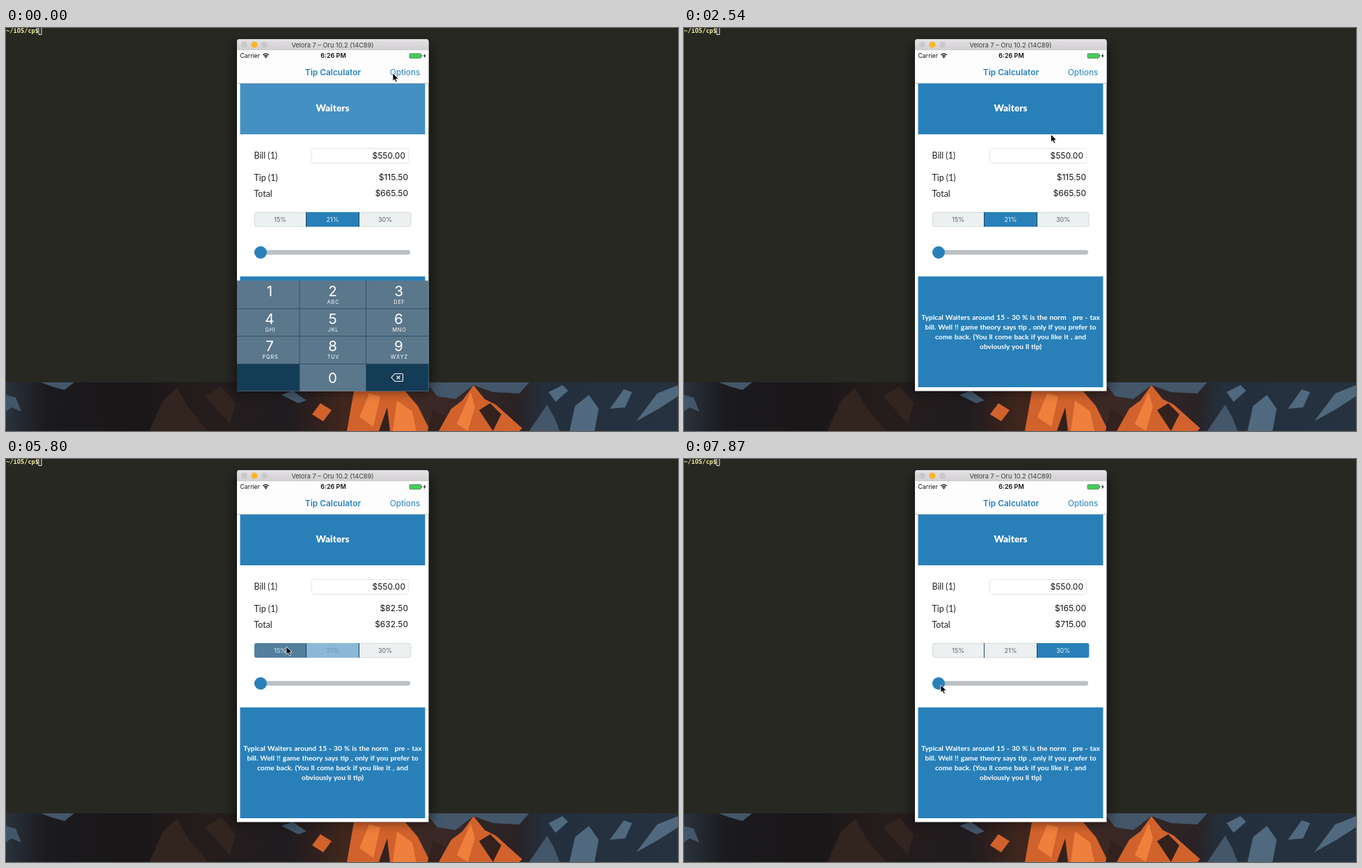
Recreate the animation shown at these times as an HTML page. Size 966x580 px, loop 8 s.

```html
<!DOCTYPE html>
<html lang="en">
<head>
<meta charset="utf-8">
<title>Tip Calculator</title>
<style>
  html, body { margin: 0; width: 100%; height: 100%; overflow: hidden; background: #272822; }
  svg { display: block; width: 966px; height: 580px; }
  text { font-family: Inter, sans-serif; white-space: pre; }
  .lato { font-family: Lato, sans-serif; }
  .mid { text-anchor: middle; }
  .end { text-anchor: end; font-size: 12px; fill: #111; }
  .label { font-size: 12.4px; fill: #222; }
  .note { font-size: 10.2px; font-weight: 700; fill: #fff; word-spacing: .6px; }
  .pct { font-size: 9px; }
  .digit { font-size: 20.6px; fill: #fff; }
  .abc { font-size: 7.3px; letter-spacing: .8px; fill: #fff; }
</style>
</head>
<body>
<svg viewBox="0 0 966 580">
  <defs>
    <linearGradient id="bar" x2="0" y2="1">
      <stop stop-color="#e4e2e4"/><stop offset="1" stop-color="#d0ced0"/>
    </linearGradient>
    <linearGradient id="rock">
      <stop stop-color="#2a323c"/><stop offset=".06" stop-color="#1b1a1e"/>
      <stop offset=".2" stop-color="#1a1618"/><stop offset=".3" stop-color="#251d1c"/>
      <stop offset=".42" stop-color="#1f1b1f"/><stop offset=".5" stop-color="#40261d"/>
      <stop offset=".64" stop-color="#3a2926"/><stop offset=".76" stop-color="#2a2225"/>
      <stop offset=".8" stop-color="#232f3c"/><stop offset="1" stop-color="#26323f"/>
    </linearGradient>
    <filter id="blur" x="-20%" y="-20%" width="140%" height="140%"><feGaussianBlur stdDeviation="8"/></filter>
    <clipPath id="win"><path d="M332 522.500V20q0-4 4-4H603.500q4 0 4 4V522.500Z"/></clipPath>
    <clipPath id="seg"><rect x="357" y="265" width="225.500" height="21" rx="3"/></clipPath>
  </defs>

  <!-- desktop -->
  <rect width="966" height="580" fill="#272822"/>
  <rect y="510" width="966" height="70" fill="url(#rock)"/>
  <g fill="#43566a">
    <path d="M50 510H98L84 521 66 516Z"/>
    <path d="M0 528L14 532 22 552 8 546 0 552Z"/>
    <path d="M396 528L412 522 432 536 420 540Z"/>
    <path d="M604 510H752L738 526 700 524 672 514 646 534 620 530Z"/>
    <path d="M752 580L778 542 788 560 796 580Z"/>
  </g>
  <g fill="#50697f">
    <path d="M810 580L818 544 838 528 852 548 846 580Z"/>
    <path d="M868 548L888 520 900 524 890 546Z"/>
    <path d="M906 566L936 526 966 514V530L938 548Z"/>
    <path d="M780 524L800 514 808 522 790 538Z"/>
  </g>
  <path fill="#32241f" d="M206 580L226 536 246 518 262 546 290 580ZM286 530L310 516 330 540 322 570Z"/>
  <g fill="#d2622c">
    <path d="M490 580L500 523H574L592 544 610 580Z"/>
    <path d="M622 580L640 548 656 536 672 514 688 534 704 542 742 576 738 580Z"/>
    <path d="M440 556L452 540 468 550 456 566Z"/>
  </g>
  <g fill="#ee7f3c">
    <path d="M508 560L522 526 538 530 528 574Z"/>
    <path d="M556 580L562 536 584 552 590 580Z"/>
    <path d="M648 570L668 524 674 546 664 580Z"/>
  </g>
  <path fill="#33211e" d="M536 580L548 546 552 580ZM606 580L614 548 632 560 622 580ZM680 550L696 540 712 556 700 580Z"/>

  <text x="0" y="7.300" font-size="8.700" font-weight="700" fill="#f3f0a0" style="font-family:'DejaVu Sans Mono',monospace">~/iOS/cp$</text>
  <path d="M47 -1V9.500H51V-1" fill="none" stroke="#eee"/>

  <!-- simulator window -->
  <rect x="328" y="24" width="284" height="500" fill="#000" opacity=".45" filter="url(#blur)"/>
  <g clip-path="url(#win)">
    <rect x="332" y="16" width="276" height="507" fill="#fff"/>
    <rect x="332" y="16" width="276" height="16.500" fill="url(#bar)"/>
    <g fill="#cac8ca"><circle cx="342.500" cy="24" r="4.500"/><circle cx="371.500" cy="24" r="4.500"/></g>
    <circle cx="357" cy="24" r="4.600" fill="#fdb42c"/>
    <text class="mid" x="469.500" y="27.600" font-size="9.200" fill="#3c3c3c">Velora 7 – Oru 10.2 (14C89)</text>

    <rect x="332" y="32" width="276" height="47" fill="#fdfdfd"/>
    <path d="M332 79.500H608" stroke="#c2c4c6"/>
    <text x="336.500" y="43.200" font-size="8.700" fill="#111">Carrier</text>
    <g fill="none" stroke="#111" stroke-width="1.300">
      <path d="M369.300 38.800Q373.500 35 377.700 38.800M371 40.600Q373.500 38.400 376 40.600"/>
    </g>
    <path d="M371.900 41.700Q373.500 40.500 375.100 41.700L373.500 43.500Z" fill="#111"/>
    <text class="mid" x="470.500" y="43.300" font-size="9" font-weight="600" fill="#111">6:26 PM</text>
    <rect x="580" y="36.800" width="16.500" height="6.600" rx="1" fill="#42cf57" stroke="#5a6a5c" stroke-width=".7"/>
    <rect x="597.200" y="38.800" width="1" height="2.600" fill="#444"/>
    <path d="M602.600 36.500L599.800 40.600H601.500L600.800 43.600 603.900 39.400H602Z" fill="#222"/>
    <g fill="#2980b9">
      <text class="mid" x="470" y="67.500" font-size="11.900" font-weight="600">Tip Calculator</text>
      <text class="mid" x="573.500" y="67.500" font-size="11.900">Options</text>
    </g>

    <rect id="head" x="336.500" y="80" width="266" height="73" fill="#2980b9"/>
    <text class="lato mid" x="469.500" y="120.300" font-size="13.600" font-weight="900" fill="#fff">Waiters</text>

    <text class="lato label" x="356.500" y="188">Bill (1)</text>
    <text class="lato label" x="356.500" y="219.800">Tip (1)</text>
    <text class="lato label" x="356.500" y="243">Total</text>
    <rect x="439.500" y="173.500" width="139" height="21" rx="3" fill="#fff" stroke="#e4e4e4"/>
    <text class="end" x="574" y="187.800">$550.00</text>
    <rect id="caret" x="572.300" y="177" width="2" height="14" fill="#fff"/>
    <text class="end" id="tip" x="578" y="219"></text>
    <text class="end" id="total" x="578" y="242.300"></text>

    <rect x="357.400" y="265.400" width="224.700" height="20.200" rx="3" fill="#ecf0f1" stroke="#cbd1d4" stroke-width=".8"/>
    <g id="cells" clip-path="url(#seg)"></g>
    <path d="M431.500 265V286M507.500 265V286" stroke="#1d4361"/>

    <rect x="357" y="319.600" width="224" height="6.600" rx="3.300" fill="#bcc0c4"/>
    <circle cx="366" cy="323" r="9" fill="#2980b9"/>

    <rect x="336.500" y="357.500" width="266" height="159.500" fill="#2980b9"/>
    <g class="mid">
      <text class="lato note" x="469.500" y="419.700">Typical Waiters around 15 - 30 % is the norm   pre - tax</text>
      <text class="lato note" x="469.500" y="433.700">bill. Well !! game theory says tip , only if you prefer to</text>
      <text class="lato note" x="469.500" y="447.700">come back. (You ll come back if you like it , and</text>
      <text class="lato note" x="469.500" y="461.700">obviously you ll tip)</text>
    </g>

    <g id="pad">
      <rect x="332" y="363.500" width="276" height="160" fill="#5b778c"/>
      <path d="M332 483.500H422V523H332ZM517.500 483.500H608V523H517.500Z" fill="#153c57"/>
      <path d="M332 404H608M332 443.500H608M332 483.500H608M422 363.500V523M517.500 363.500V523" stroke="#2f5069" fill="none"/>
      <path d="M559 497.500H569Q570.500 497.500 570.500 499V507Q570.500 508.500 569 508.500H559L554 503ZM561.500 500.500L566.500 505.500M566.500 500.500L561.500 505.500" fill="none" stroke="#fff" stroke-width="1.100"/>
    </g>
  </g>

  <path id="cursor" d="M0 0V11.200L2.600 8.900 4.500 13 6.400 12.200 4.600 8.200H8.200Z" fill="#000" stroke="#fff" stroke-width=".8"/>
</svg>
<script>
  const $ = id => document.getElementById(id);
  const LOOP = 8000, TICK = 148.6, LEAD = 9;

  function add(parent, tag, attrs, text = '') {
    const el = document.createElementNS('http://www.w3.org/2000/svg', tag);
    for (const k in attrs) el.setAttribute(k, attrs[k]);
    el.textContent = text;
    return parent.appendChild(el);
  }

  // keypad
  const letters = ['', 'ABC', 'DEF', 'GHI', 'JKL', 'MNO', 'PQRS', 'TUV', 'WXYZ'];
  const keyX = [379, 469.5, 564.5];
  letters.forEach((abc, i) => {
    const x = keyX[i % 3], y = 386 + 39.7 * Math.floor(i / 3);
    add($('pad'), 'text', { class: 'digit mid', x, y }, i + 1);
    add($('pad'), 'text', { class: 'abc mid', x: x + 1, y: y + 11 }, abc);
  });
  add($('pad'), 'text', { class: 'digit mid', x: 469.5, y: 510.5 }, '0');

  // segmented control
  const rates = [15, 21, 30];
  const edges = [357, 431.5, 507.5, 582.5];
  const looks = {
    off: ['none', '#5c6063'],
    on: ['#2980b9', '#e8f1f7'],
    press: ['#537f9d', '#dfe8ee'],
    fade: ['#8bb8d7', '#7592a6']
  };
  const cells = rates.map((rate, i) => ({
    box: add($('cells'), 'rect', { x: edges[i], y: 265, width: edges[i + 1] - edges[i], height: 21 }),
    text: add($('cells'), 'text', { class: 'pct mid', x: (edges[i] + edges[i + 1]) / 2, y: 279 }, rate + '%')
  }));

  // cursor path: tick, x, y
  const path = [
    [0, 556, 65], [3, 556, 66], [7, 551, 79], [9, 500, 110], [10, 488, 117], [13, 488, 117],
    [20, 557, 180], [23, 562, 194], [26, 555, 217], [27, 555, 217], [29, 547, 240], [31, 547, 240],
    [34, 403, 270], [39, 403, 270], [43, 520, 285], [44, 534, 282], [46, 534, 281],
    [52, 368, 324], [53, 369, 325]
  ];
  function cursorAt(n) {
    const i = Math.max(1, path.findIndex(p => p[0] >= n));
    const [a, x, y] = path[i - 1], [b, u, v] = path[i];
    const k = (n - a) / (b - a);
    return [x + (u - x) * k, y + (v - y) * k];
  }

  function render(n) {
    const [x, y] = cursorAt(n);
    $('cursor').setAttribute('transform', `translate(${x} ${y})`);
    $('head').setAttribute('fill-opacity', Math.min(1, .87 + n * .03));
    $('caret').style.display = n > 3 && n < 7 || n > 9 && n < 13 ? '' : 'none';
    $('pad').setAttribute('transform', `translate(0 ${n < 13 ? 0 : n < 14 ? 154.5 : 170})`);

    const pick = n < 38 ? 1 : n < 45 ? 0 : 2;
    const last = n < 45 ? 1 : 0;
    const changing = n === 38 || n === 39 || n === 45 || n === 46;
    cells.forEach((cell, i) => {
      const look = i === pick ? (changing ? 'press' : 'on') : changing && i === last ? 'fade' : 'off';
      cell.box.setAttribute('fill', looks[look][0]);
      cell.text.setAttribute('fill', looks[look][1]);
    });
    const tip = 550 * rates[pick] / 100;
    $('tip').textContent = '$' + tip.toFixed(2);
    $('total').textContent = '$' + (550 + tip).toFixed(2);
  }

  // the screen refreshes in coarse ticks
  function frame() {
    const t = performance.now() % LOOP;
    render(Math.min(53, Math.floor((t + LEAD) / TICK)));
    requestAnimationFrame(frame);
  }
  frame();
</script>
</body>
</html>
```
